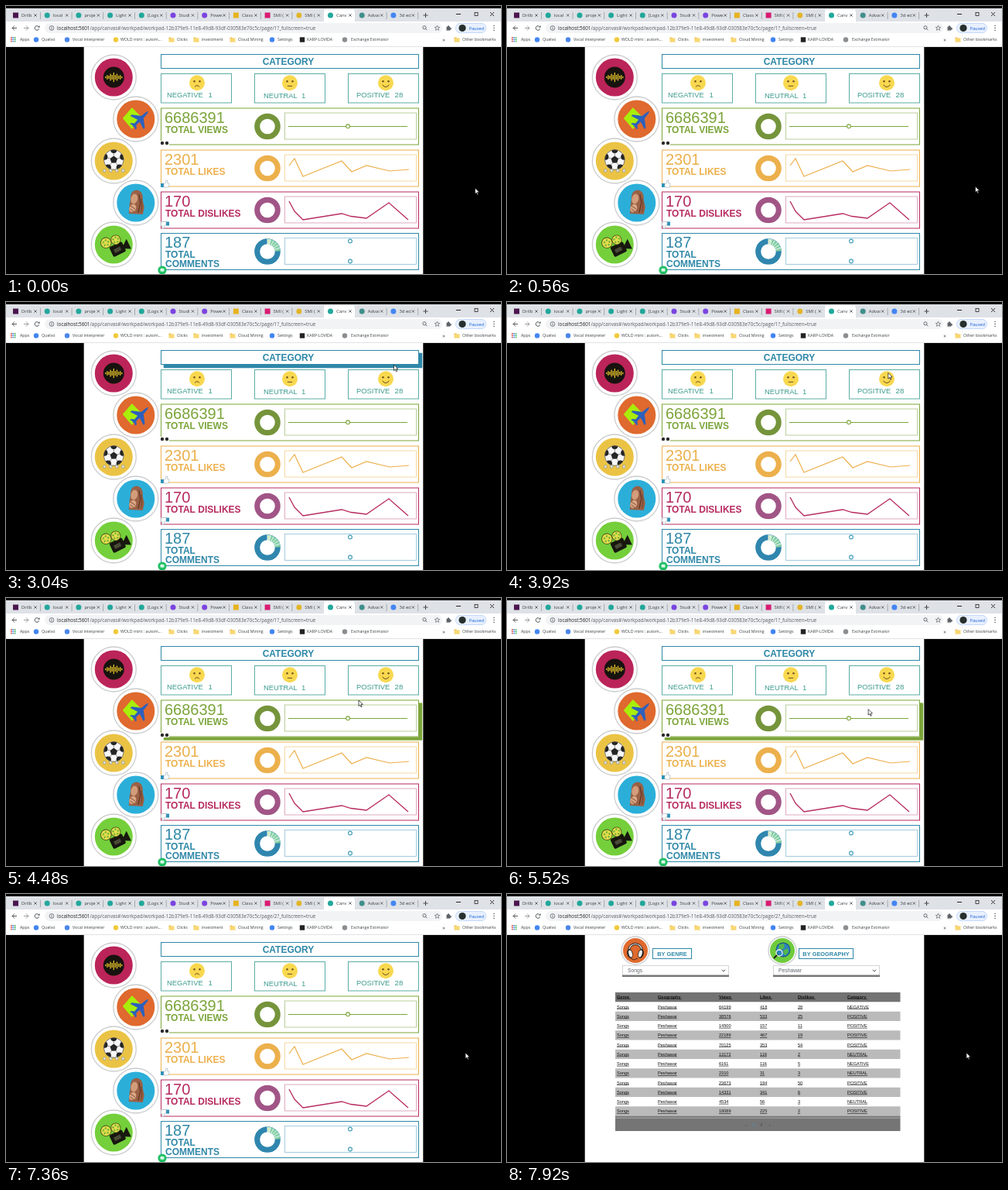
Animation of 640 by 346 pixels, one loop 8000 ms. Source, as an HTML page with a canvas:

```html
<!DOCTYPE html>
<html lang="en">
<head>
<meta charset="utf-8">
<title>Dashboard</title>
<style>
html, body { margin: 0; width: 100%; height: 100%; overflow: hidden; background: #000; }
canvas { display: block; width: 640px; height: 346px; }
</style>
</head>
<body>
<canvas id="stage"></canvas>
<script>
const W = 640, H = 346, LOOP = 8000;
const canvas = document.getElementById('stage');
const c = canvas.getContext('2d');
const dpr = window.devicePixelRatio || 1;
canvas.width = W * dpr;
canvas.height = H * dpr;

const UI = '"Open Sans", sans-serif';
const ARIAL = '"Liberation Sans", sans-serif';

// ---- drawing helpers ----
function text(s, x, y, size, color, { font = ARIAL, bold = false, align = 'left', line = false } = {}) {
  c.font = `${bold ? 'bold ' : ''}${size}px ${font}`;
  c.textAlign = align;
  c.fillStyle = color;
  c.fillText(s, x, y);
  const w = c.measureText(s).width;
  if (line) c.fillRect(x, y + 0.8, w, 0.6);
  return w;
}
function rect(x, y, w, h, color) {
  c.fillStyle = color;
  c.fillRect(x, y, w, h);
}
function frame(x, y, x2, y2, color, lw = 1) {
  c.strokeStyle = color;
  c.lineWidth = lw;
  c.strokeRect(x + 0.5, y + 0.5, x2 - x - 1, y2 - y - 1);
}
function pill(x, y, w, h, r, color) {
  c.beginPath();
  c.roundRect(x, y, w, h, r);
  c.fillStyle = color;
  c.fill();
}
function disc(x, y, r, color) {
  c.beginPath();
  c.arc(x, y, r, 0, 7);
  c.fillStyle = color;
  c.fill();
}
function oval(x, y, rx, ry, color, turn = 0) {
  c.beginPath();
  c.ellipse(x, y, rx, ry, turn, 0, 7);
  c.fillStyle = color;
  c.fill();
}
function arc(x, y, r, a, b, color, lw) {
  c.beginPath();
  c.arc(x, y, r, a, b);
  c.strokeStyle = color;
  c.lineWidth = lw;
  c.stroke();
}
function trace(points) {
  c.beginPath();
  points.forEach(([x, y]) => c.lineTo(x, y));
}
function line(points, color, lw = 1) {
  trace(points);
  c.strokeStyle = color;
  c.lineWidth = lw;
  c.stroke();
}
function poly(points, color) {
  trace(points);
  c.closePath();
  c.fillStyle = color;
  c.fill();
}
function at(x, y, turn, draw) {
  c.save();
  c.translate(x, y);
  c.rotate(turn);
  draw();
  c.restore();
}

// ---- browser window ----
const TABS = [
  ['Drilb', '#4b1650', 1], ['local', '#22a79b'], ['proje', '#22a79b'], ['Light', '#22a79b'],
  ['[Logs', '#22a79b'], ['Studi', '#7b45e0'], ['Power', '#7b45e0'], ['Class', '#e6b422', 1],
  ['SMI (', '#d81b72', 1], ['SMI (', '#e3b52a'], ['Canv', '#22a79b'], ['Advan', '#3f8f8b'], ['3d ed', '#4285f4']
];
const MARKS = [
  ['Quelvo', 39, 46, '#4285f4'], ['Vocal interpreter', 79, 86, '#4a86e8'],
  ['WOLD mint : autom...', 142, 148, '#f0c93a'], ['Clicks', 214, 221], ['investment', 246, 253],
  ['Cloud Mining', 293, 300], ['Settings', 344, 351, '#4285f4'],
  ['KARP-LOVIDA', 383, 389, '#222', 1], ['Exchange Estimator', 438, 446, '#8a8d91'], ['Other bookmarks', 583, 590]
];

function badge(x, y, r, color, square) {
  square ? rect(x - r, y - r, r * 2, r * 2, color) : disc(x, y, r, color);
}
function folder(x, y) {
  rect(x - 3.5, y - 3, 3, 2, '#e8b93c');
  rect(x - 3.5, y - 2.2, 7, 5.4, '#f8d775');
}

function drawTabs() {
  rect(0, 3, W, 17, '#dee1e6');
  pill(411, 4, 40, 17, [4, 4, 0, 0], '#fff');
  TABS.forEach(([name, color, square], i) => {
    const x = 12.5 + i * 40.7;
    badge(x, 12, 3.5, color, square);
    c.save();
    c.beginPath();
    c.rect(x + 7, 3, 15.5, 17);
    c.clip();
    text(name, x + 7.5, 14, 5.9, '#3c4043', { font: UI });
    c.restore();
    const k = x + 25.5;
    line([[k - 1.6, 10.4], [k + 1.6, 13.6]], '#45494d', 0.8);
    line([[k + 1.6, 10.4], [k - 1.6, 13.6]], '#45494d', 0.8);
    if (i !== 9 && i !== 10) rect(x + 31.5, 8, 0.7, 9, '#8f9398');
  });
  line([[539.5, 12], [545.5, 12]], '#45494d');
  line([[542.5, 9], [542.5, 15]], '#45494d');
  line([[582, 10.5], [588, 10.5]], '#222');
  frame(605.5, 8, 610.5, 13, '#222', 0.8);
  line([[626, 8], [631, 13]], '#222', 0.9);
  line([[631, 8], [626, 13]], '#222', 0.9);
}

function arrow(x, dir) {
  const color = dir > 0 ? '#9a9da1' : '#54585c';
  line([[x - 3 * dir, 28.5], [x + 3 * dir, 28.5]], color);
  line([[x, 25.5], [x + 3 * dir, 28.5], [x, 31.5]], color);
}

function drawToolbar(page) {
  rect(0, 20, W, 32, '#fff');
  rect(0, 52, W, 1, '#e1e3e6');
  arrow(11, -1);
  arrow(26, 1);
  arc(40, 28.5, 2.8, 0.3, 5.5, '#54585c', 1);
  poly([[41, 27.8], [43.6, 27.8], [43.6, 25]], '#54585c');
  pill(50, 22, 514, 13, 6.5, '#f1f3f4');
  arc(59, 28.5, 2.9, 0, 7, '#5f6368', 0.8);
  rect(58.6, 28, 0.9, 2.2, '#5f6368');
  rect(58.6, 26.5, 0.9, 0.9, '#5f6368');
  const host = 'localhost:5601';
  const w = text(host, 66, 30.8, 6.3, '#202124', { font: UI });
  text(`/app/canvas#/workpad/workpad-12b379e9-11e8-49d8-93df-030583e70c5c/page/${page}?_fullscreen=true`,
    66 + w, 30.8, 6.3, '#5a5e63', { font: UI });
  arc(541, 27.8, 2.1, 0, 7, '#5f6368', 0.9);
  line([[542.6, 29.4], [544.4, 31.2]], '#5f6368', 1);
  const star = Array.from({ length: 11 }, (_, i) => {
    const a = i * Math.PI / 5 - Math.PI / 2, r = i % 2 ? 1.5 : 3.4;
    return [557.5 + r * Math.cos(a), 28.5 + r * Math.sin(a)];
  });
  line(star, '#5f6368', 0.7);
  rect(569.5, 26.8, 4.8, 4.8, '#5f6368');
  disc(572, 26.4, 1.2, '#5f6368');
  disc(574.6, 29.2, 1.2, '#5f6368');
  pill(581, 22, 40, 13, 6.5, '#b9d0f6');
  pill(581.7, 22.7, 38.6, 11.6, 5.8, '#e8f0fe');
  disc(590, 28.5, 4.6, '#27302c');
  text('Paused', 598.5, 30.6, 5.7, '#1a5fd0', { font: UI });
  [25.5, 28.5, 31.5].forEach(y => disc(631, y, 0.8, '#54585c'));

  for (let i = 0; i < 9; i++) {
    rect(6 + i % 3 * 2.4, 40 + Math.floor(i / 3) * 2.4, 1.6, 1.6, ['#e0483e', '#4285f4', '#34a853'][i % 3]);
  }
  text('Apps', 18, 45.4, 5.3, '#3c4043', { font: UI });
  MARKS.forEach(([name, ix, x, color, square]) => {
    color ? badge(ix, 43.5, 3.2, color, square) : folder(ix, 43.5);
    text(name, x, 45.4, 5.3, '#3c4043', { font: UI });
  });
  text('»', 566, 46, 7, '#3c4043', { font: UI, align: 'center' });
}

// ---- round picture buttons ----
function medal(x, y, r, color, gap, draw) {
  c.save();
  c.shadowColor = 'rgba(0,0,0,.2)';
  c.shadowBlur = dpr;
  disc(x, y, r, '#fff');
  c.restore();
  arc(x, y, r - 0.6, 0, 7, '#c6c8ca', 1.1);
  disc(x, y, r - gap, color);
  at(x, y, 0, draw);
}

function wave() {
  disc(0, 0, 13.5, '#17130f');
  for (let i = -5; i <= 5; i++) {
    const h = (9 - Math.abs(i) * 1.2) * (i % 2 ? 0.75 : 1.35);
    rect(i * 2.1 - 0.6, -h / 2, 1.2, h, '#f5cf2c');
  }
}
function plane() {
  poly([[-5, -15], [8, -2], [-5, 13], [-17, -1]], '#a9ee0a');
  at(6, 0, Math.PI / 4, () => {
    oval(0, 0, 2.1, 14, '#2c60bd');
    poly([[-1.5, -4], [-12, 4], [-12, 6.5], [-1.5, 3]], '#2c60bd');
    poly([[1.5, -4], [12, 4], [12, 6.5], [1.5, 3]], '#2c60bd');
    poly([[0, 8], [-5, 12], [-5, 14], [0, 12.5], [5, 14], [5, 12]], '#2c60bd');
  });
}
function ball() {
  const ring = (r, n, a0 = -Math.PI / 2) => Array.from({ length: n }, (_, i) =>
    [r * Math.cos(a0 + i * 2 * Math.PI / n), r * Math.sin(a0 + i * 2 * Math.PI / n)]);
  at(0, -1.5, 0, () => {
    c.save();
    c.beginPath();
    c.arc(0, 0, 13, 0, 7);
    c.clip();
    rect(-13, -13, 26, 26, '#f7f7f7');
    poly(ring(5, 5), '#252525');
    ring(5, 5).forEach(([x, y]) => line([[x, y], [x * 1.9, y * 1.9]], '#777', 0.8));
    ring(12.5, 5).forEach(([x, y]) => disc(x, y, 4, '#252525'));
    c.restore();
    arc(0, 0, 12.8, 0, 7, '#444', 0.7);
  });
  [-12, -4, 4, 12].forEach(x => {
    disc(x, 12.5, 2.2, '#a3a49b');
    disc(x, 12.5, 1.2, '#f0f0ee');
  });
}
function talker() {
  oval(1, -7, 8, 9.5, '#9a6146');
  poly([[-6, -10], [8, -8], [11, 6], [9, 15], [-9, 14], [-8, 2]], '#9a6146');
  oval(-2, -5, 4.4, 6.5, '#d39c7b', 0.2);
  oval(-4, 7, 4.2, 5.5, '#d9a583', 0.5);
  line([[-7, 4], [-1, 8]], '#7a4630', 0.9);
  line([[-7, 8], [-2, 12]], '#7a4630', 0.9);
  line([[4, -11], [6, 0], [3, 13]], '#5f3522', 1.2);
  line([[7, -6], [8, 3], [7, 12]], '#6e3f2a', 0.9);
}
function camera() {
  c.translate(2, 2);
  c.rotate(-0.45);
  pill(-8, -2, 18, 14, 2, '#17170f');
  poly([[9, 4], [17, -2], [17, 12], [9, 8]], '#17170f');
  rect(-4, 3, 9, 5, '#4a4a38');
  [[-9, -9, 7.2], [4, -7, 6.5]].forEach(([x, y, r]) => {
    disc(x, y, r, '#3f4a18');
    disc(x, y, r - 0.8, '#e3dc4a');
    for (let i = 0; i < 5; i++) {
      disc(x + 3.4 * Math.cos(i * 1.257), y + 3.4 * Math.sin(i * 1.257), 1.3, '#74b53a');
    }
  });
}
function phones() {
  arc(0, 0, 8.5, Math.PI, 0, '#222', 3);
  arc(0, 0, 8.5, Math.PI, 0, '#f2f2f2', 1.2);
  [-1, 1].forEach(s => {
    oval(s * 7, 4, 3.6, 6, '#222', s * 0.25);
    oval(s * 6.4, 4, 2.2, 4.6, '#f2f2f2', s * 0.25);
  });
  line([[-6, 10], [-2, 12], [3, 10]], '#222', 0.8);
}
function globe() {
  disc(1, -1, 9.5, '#16507c');
  disc(1, -1, 8.6, '#2b83bd');
  poly([[-4, -8], [2, -9], [3, -4], [-1, -1], [-5, -2]], '#54b64a');
  poly([[1, 0], [7, -3], [8, 2], [4, 6], [2, 5]], '#54b64a');
  arc(-4, 3, 4, 0, 7, '#f4f4f4', 1.3);
  line([[-7, 6], [-11, 10]], '#222', 2.2);
}

// ---- first page ----
const BLUE = '#2f88a8', TEAL = '#3b9b8d', MINT = '#5aaca5';
const GREEN = '#7ca53a', AMBER = '#ecb04c', CRIMSON = '#b72a5f';

function panel(x, y, x2, y2, color, glow = 0) {
  if (glow > 0) {
    c.save();
    c.globalAlpha = glow;
    c.shadowColor = color;
    c.shadowBlur = 1.5 * dpr;
    rect(x + 4, y + 4, x2 - x, y2 - y, color);
    c.restore();
  }
  rect(x, y, x2 - x, y2 - y, '#fff');
  frame(x, y, x2, y2, color);
}

function face(x, y, mood) {
  disc(x, y, 10, '#f9d84f');
  disc(x - 3.5, y - 2, 1.2, '#6a4d22');
  disc(x + 3.5, y - 2, 1.2, '#6a4d22');
  if (mood < 0) arc(x, y + 7, 3.6, 3.7, 5.75, '#6a4d22', 1);
  if (mood === 0) line([[x - 3.2, y + 4], [x + 3.2, y + 4]], '#6a4d22');
  if (mood > 0) arc(x, y + 0.5, 4.6, 0.4, 2.74, '#6a4d22', 1);
}

function moodBox(x, label, lx, ly, count, nx, ny, fx, mood) {
  panel(x, 87, x + 92, 125.5, MINT);
  face(fx, 99.3, mood);
  text(label, lx, ly, 9.4, TEAL);
  text(count, nx, ny, 9.7, TEAL);
}

function card(y, color, tint, count, words, ringColor, glow) {
  panel(200, y, 534, y + 48, color, glow);
  text(count, 205, y + 19.2, 20, color);
  words.forEach((word, i) => text(word, 206, y + 32.3 + i * 11.7, 12, color, { bold: true }));
  arc(338, y + 24, 13.3, 0, 7, ringColor, 7);
  frame(360, y + 6, 531, y + 41, tint, 0.8);
}

function hollow(x, y, color) {
  disc(x, y, 2.6, '#fff');
  arc(x, y, 2.4, 0, 7, color, 1.1);
}

function thumb(x, y, side) {
  c.save();
  c.translate(x, y);
  c.scale(side, side);
  rect(-5, -2, 4, 5, '#2b92b8');
  trace([[-1, -1], [1, -2], [2, -6], [4, -6], [3.5, -2.5], [6, -2], [5.5, 3], [-1, 3]]);
  c.closePath();
  c.fillStyle = '#fff';
  c.fill();
  c.strokeStyle = '#a9b6bf';
  c.lineWidth = 0.7;
  c.stroke();
  c.restore();
}

function drawSummary(glow) {
  medal(139.3, 92, 29.5, '#bb2458', 5, wave);
  medal(167.8, 146, 29.5, '#df692e', 5, plane);
  medal(139.3, 200, 29.5, '#ebc344', 5, ball);
  medal(167.8, 254, 29.5, '#2bafd9', 5, talker);
  medal(139.3, 308, 29.5, '#74cf3b', 5, camera);

  panel(200, 62, 534, 81, BLUE, glow.category);
  text('CATEGORY', 365, 76.4, 12, BLUE, { bold: true, align: 'center' });
  moodBox(200, 'NEGATIVE', 208, 118.4, '1', 261.5, 118, 247, -1);
  moodBox(321, 'NEUTRAL', 333, 118.6, '1', 382, 119, 367, 0);
  moodBox(442, 'POSITIVE', 453, 117.6, '28', 502.5, 117.6, 491, 1);

  card(131.5, GREEN, '#a9c383', '6686391', ['TOTAL VIEWS'], '#75943b', glow.views);
  line([[365, 155.5], [519, 155.5]], GREEN, 1.1);
  hollow(442, 155.3, GREEN);
  rect(199, 174, 12, 6, '#fff');
  disc(202, 177, 2.2, '#2a2a2a');
  disc(208, 177, 2.2, '#2a2a2a');

  card(185.5, AMBER, '#f2d08c', '2301', ['TOTAL LIKES'], AMBER, glow.likes);
  line([[366, 206], [373, 197], [384, 220], [434, 200], [447, 214], [466, 206], [496, 213], [521, 211]], AMBER, 1.2);
  thumb(205, 231, 1);

  card(239.5, CRIMSON, '#d795b0', '170', ['TOTAL DISLIKES'], '#a15586');
  line([[366, 252], [373, 265], [384, 276], [434, 268], [446, 271.5], [466, 274], [495, 254], [520, 276]], CRIMSON, 1.3);
  thumb(206, 281.5, -1);

  card(293, BLUE, '#8cc0d3', '187', ['TOTAL', 'COMMENTS'], '#2f86ae');
  at(338, 317.5, -Math.PI / 2, () => {
    const step = 0.25;
    for (let i = 0; i < 6; i++) {
      arc(0, 0, 13.3, i * step, (i + 1) * step, i ? '#86d0a4' : '#cde8bd', 7);
      at(0, 0, i * step, () => line([[9.5, 0], [17, 0]], '#fff', 0.8));
    }
  });
  hollow(445, 303.5, '#3d9bb8');
  hollow(445, 329.5, '#3d9bb8');
  disc(202, 341, 5.6, '#20c065');
  pill(199.5, 338.8, 5, 4, 1, '#d9f7e5');
}

// ---- second page ----
const COLS = [142, 195, 274, 327, 376, 440];
const HEADS = ['Genre', 'Geography', 'Views', 'Likes', 'Dislikes', 'Category'];
const ROWS = [
  '64199 418 28 NEGATIVE', '38576 533 25 POSITIVE', '14500 157 11 POSITIVE', '22189 467 19 POSITIVE',
  '70125 353 54 POSITIVE', '13172 119 2 NEUTRAL', '6161 116 5 NEGATIVE', '2310 31 3 NEUTRAL',
  '23673 194 50 POSITIVE', '14331 341 6 POSITIVE', '4534 56 3 NEUTRAL', '18069 225 2 POSITIVE'
].map(r => ['Songs', 'Peshawar', ...r.split(' ')]);

function picker(x, x2, label) {
  frame(x, 92, x2, 106, '#c9ccd0', 0.8);
  rect(x, 104.5, x2 - x, 2.5, '#777');
  text(label, x + 7, 101.4, 6.75, '#5f6670');
  line([[x2 - 9.2, 97.8], [x2 - 7, 100], [x2 - 4.8, 97.8]], '#555', 1);
}
function caption(x, x2, y, label) {
  frame(x, y, x2, 84, BLUE);
  text(label, (x + x2) / 2, y + 9.8, 7.4, BLUE, { bold: true, align: 'center' });
}

function drawTable() {
  medal(166, 73, 18.5, '#df692e', 2.5, phones);
  medal(356, 73, 18.5, '#6fcb3c', 2.5, globe);
  caption(188, 239, 70, 'BY GENRE');
  caption(377, 448, 70, 'BY GEOGRAPHY');
  picker(149, 287, 'Songs');
  picker(344, 482, 'Peshawar');

  rect(140, 127, 368.5, 12.3, '#737373');
  HEADS.forEach((h, i) => text(h + ' ', COLS[i], 134.6, 5.6, '#111', { bold: true, line: true }));
  ROWS.forEach((row, r) => {
    const y = 139.5 + r * 12.25;
    if (r % 2) rect(140, y, 368.5, 12.25, '#bababa');
    row.forEach((cell, i) => text(cell, COLS[i], y + 8, 5.6, '#111', { line: true }));
  });
  rect(140, 286.5, 368.5, 19.5, '#757575');
  rect(140, 288.6, 368.5, 0.9, '#b5b5b5');
  [['‹', 309, '#4d4d4d'], ['1', 319, '#3f9dc0'], ['2', 329, '#4a4a4a'], ['›', 339.5, '#4a4a4a']]
    .forEach(([s, x, color]) => text(s, x, 300, 6.2, color, { align: 'center' }));
}

// ---- motion ----
const PATH = [
  [0, 606.5, 235], [560, 605.5, 233], [800, 605, 230], [1440, 601, 55], [2000, 601, 55], [2640, 514, 71],
  [3040, 501.5, 81], [3440, 495, 89], [3840, 495, 89], [4400, 456, 132], [5280, 456, 132],
  [6080, 507, 185], [6320, 508.5, 184], [6640, 508.5, 184], [7040, 594, 205], [LOOP, 594, 205]
];
const clamp = v => Math.min(1, Math.max(0, v));
const ease = v => v * v * (3 - 2 * v);

function pointer(t) {
  const i = PATH.findIndex(p => p[0] > t);
  const [t0, x0, y0] = PATH[i - 1], [t1, x1, y1] = PATH[i];
  const k = ease((t - t0) / (t1 - t0));
  return [x0 + (x1 - x0) * k, y0 + (y1 - y0) * k];
}
const hover = (t, on, off) => ease(clamp((t - on) / 240)) * (1 - ease(clamp((t - off) / 240)));

function drawPointer([x, y]) {
  at(x, y, 0, () => {
    trace([[0, 0], [0, 7.6], [1.8, 6], [3, 8.8], [4.2, 8.3], [3, 5.5], [5.4, 5.4]]);
    c.closePath();
    c.fillStyle = '#fff';
    c.fill();
    c.strokeStyle = '#111';
    c.lineWidth = 0.7;
    c.stroke();
  });
}

function draw(t) {
  c.setTransform(dpr, 0, 0, dpr, 0, 0);
  rect(0, 0, W, H, '#000');
  rect(100.7, 52, 438.6, 294, '#fff');
  if (t < 7680) {
    drawSummary({ category: hover(t, 2400, 3120), views: hover(t, 4200, 5760), likes: hover(t, 5820, 6760) });
  } else {
    drawTable();
  }
  drawTabs();
  drawToolbar(t < 7360 ? 1 : 2);
  drawPointer(pointer(t));
}

const start = performance.now();
function tick() {
  draw((performance.now() - start) % LOOP);
  requestAnimationFrame(tick);
}
tick();
</script>
</body>
</html>
```
